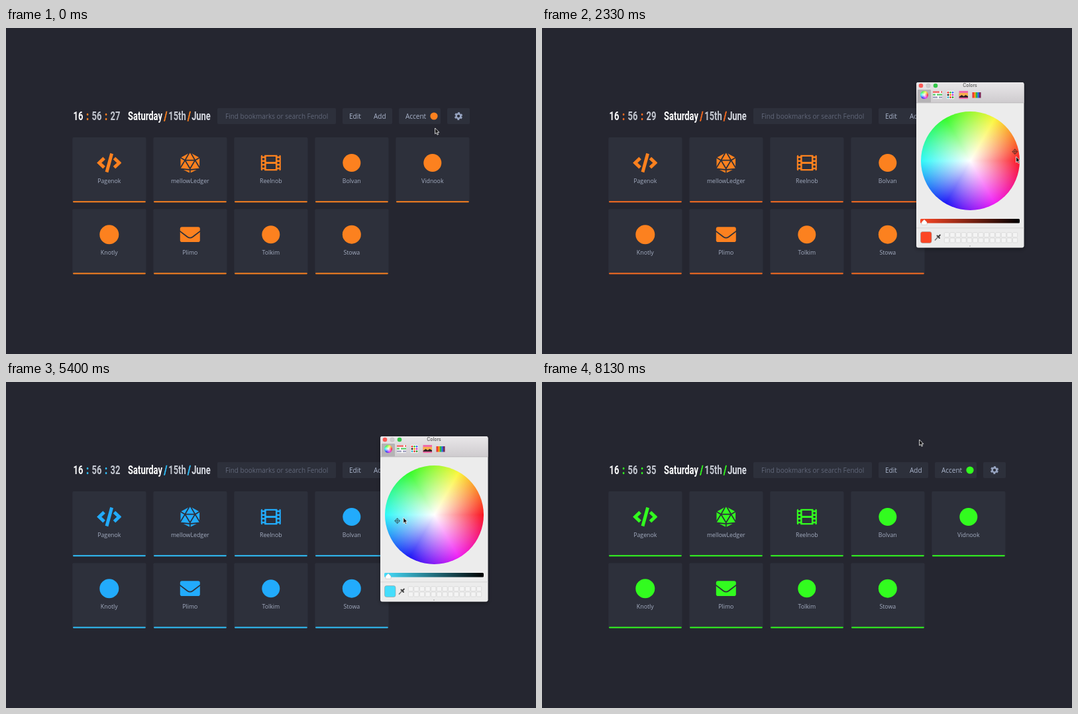
Animation of 800 by 492 pixels, one loop 8.19 s. Source, as an HTML page:

```html
<!DOCTYPE html>
<html lang="en">
<head>
<meta charset="utf-8">
<title>Start page accent colour</title>
<style>
html, body { margin: 0; width: 100%; height: 100%; overflow: hidden; background: #252630; }
svg { display: block; }
.panel { fill: #2d303b; }
.ui { font: 10px "Open Sans", sans-serif; fill: #a9b3ca; }
.label { font: 8.8px "Open Sans", sans-serif; fill: #a3acc0; text-anchor: middle; }
.clock { font: 700 18px Roboto, sans-serif; text-anchor: middle; }
.icon { fill: var(--icon); }
.line { fill: var(--line); }
.mark { fill: var(--line); stroke: var(--line); stroke-width: .7; }
.gap { fill: none; stroke: #2d303b; }
.wheel {
  width: 100%; height: 100%; border-radius: 50%;
  background: radial-gradient(closest-side, #fff, #fff0),
    conic-gradient(from 90deg, #fa1420, #f01ef4, #1c16f6, #2ef8f8, #33fb29, #fbf63a, #fa1420);
}
</style>
</head>
<body>
<svg id="stage" width="800" height="492" viewBox="0 0 800 492"></svg>
<script>
const LOOP = 8190, STEP = 66.6, WHEEL = { x: 646, y: 200.5, r: 74.5 };
const OPEN = 600, CLOSE = 7600, GRAB = 1950, DROP = 6450;

// Pointer path: time, x, y
const path = [
  [0, 647, 151], [300, 646, 134], [600, 646, 134], [1000, 644, 138], [1350, 660, 145],
  [1900, 710, 163], [2080, 710, 163], [2330, 715, 194], [2700, 712, 232], [3300, 690, 261],
  [3800, 664, 271], [4200, 659, 267], [4600, 610, 257], [5100, 579, 224], [5330, 590, 210],
  [5400, 600, 204], [5850, 616, 136], [6200, 617, 133], [6450, 618, 132], [6700, 618, 132],
  [7300, 569, 87], [LOOP, 569, 87]
];

const rect = (x, y, w, h, attrs = '') => `<rect x="${x}" y="${y}" width="${w}" height="${h}" ${attrs}/>`;
const circle = (x, y, r, attrs = '') => `<circle cx="${x}" cy="${y}" r="${r}" ${attrs}/>`;
const text = (x, y, s, attrs) => `<text x="${x}" y="${y}" ${attrs}>${s}</text>`;
const repeat = (n, f) => Array.from({ length: n }, (_, i) => f(i)).join('');
const wheel = (x, y, r) =>
  `<foreignObject x="${x - r}" y="${y - r}" width="${2 * r}" height="${2 * r}"><div class="wheel"></div></foreignObject>`;
const disc = r => circle(0, 0, r);

const chevron = '<path d="M-18.2 0L-9.4-8.4-6.4-5.2-12 0-6.4 5.2-9.4 8.4Z" stroke="var(--icon)" stroke-width=".9" stroke-linejoin="round"/>';
const icons = {
  code: chevron + `<g transform="scale(-1 1)">${chevron}</g>` +
    '<path d="M-3.8 14L3.8-14" stroke="var(--icon)" stroke-width="4.9"/>',
  die: '<path d="M0-15.5L14.3-7.7V8.2L0 15.5-14.3 8.2V-7.7Z"/>' +
    '<path class="gap" stroke-width="1.8" d="M0-17L-7.6-3.9H7.6L0-17M-15-8.2L-7.6-3.9L0 8.8L7.6-3.9L15-8.2M-15 8.2L-7.6-3.9M15 8.2L7.6-3.9M-15 9L0 10.5L15 9M0 8.8V16"/>',
  film: rect(-15, -11.7, 30, 23.4, 'rx="1.6"') +
    [-9.5, 1.5].map(y => rect(-7.2, y, 14.4, 8, 'class="panel" rx=".7"')).join('') +
    repeat(10, i => rect(i % 2 ? 9.6 : -13, (i >> 1) * 5.7 - 13, 3.4, 3.2, 'class="panel" rx=".6"')),
  mail: rect(-15, -11.4, 30, 22.8, 'rx="2.8"') +
    '<path class="gap" stroke-width="1.8" d="M-16-5.6L-4 3.5Q0 6.2 4 3.5L16-5.6"/>'
};

const cards = [
  ['Pagenok', icons.code], ['mellowLedger', icons.die], ['Reelnob', icons.film],
  ['Bolvan', disc(13.5)], ['Vidnook', disc(13.5)], ['Knotly', disc(14.5)],
  ['Plimo', icons.mail], ['Tolkim', disc(13.5)], ['Stowa', disc(14)]
];

const card = ([name, art], i) => `<g transform="translate(${100 + i % 5 * 122} ${165 + (i / 5 | 0) * 108.2})">
  ${rect(.3, 0, 111.2, 98, 'class="panel" rx="2"')}
  ${rect(1, 96.2, 109.8, 2, 'class="line" rx="1"')}
  <g class="icon" transform="translate(55.8 38.5)">${art}</g>
  ${text(55.8, 68.8, name, 'class="label"')}</g>`;

// One condensed face for the whole clock
const word = (x, s, fill, attrs = '') =>
  `<text class="clock" transform="translate(${x} 139) scale(.72 1)" ${fill} ${attrs}>${s}</text>`;
const mark = (x, s) => word(x, `<tspan class="mark">${s}</tspan>`, '');
const white = 'fill="#fff"', grey = 'fill="#c3c7d0"';

const header = word(109, '16', white) + mark(123, ':') + word(137, '56', grey) +
  mark(151, ':') + word(165, '27', grey, 'id="sec"') + word(210, 'Saturday', white) +
  mark(241, '/') + word(258.5, '15th', grey) + mark(276.5, '/') +
  word(294.5, 'June', 'fill="#d6d9e1"') +
  [[319, 179], [508, 75], [593, 63], [666, 34]].map(([x, w]) => rect(x, 121, w, 24, 'class="panel" rx="2"')).join('') +
  text(331, 136.6, 'Find bookmarks or search Fendol', 'class="ui" style="fill:#606678"') +
  text(518, 136.6, 'Edit', 'class="ui"') + text(555, 136.6, 'Add', 'class="ui"') +
  text(603, 136.6, 'Accent', 'class="ui"') +
  circle(646, 133, 5.6, 'class="line"') +
  '<g fill="none" stroke="#98a5c2">' + circle(683, 133, 3.4, 'stroke-width="2.5"') +
  circle(683, 133, 5.1, 'stroke-width="1.9" stroke-dasharray="2.8 2.54" stroke-dashoffset="-1.27"') + '</g>';

const hues = ['#f33', '#3c3', '#36f', '#222', '#f90', '#c3c', '#3bc', '#e33', '#393'];
const toolbar = rect(567, 93, 20, 19.5, 'fill="#b5b3b5" rx="1"') + wheel(577, 101, 6) +
  rect(590, 95, 14, 12, 'fill="#f7f7f7"') +
  repeat(3, i => rect(590, 95.5 + i * 4, 14, 2.2, `fill="${['#e55', '#5c6', '#99b'][i]}"`) +
    rect([600, 594, 597][i], 95 + i * 4, 2, 3.2, 'fill="#fff"')) +
  rect(611, 95, 11, 12, 'fill="#f7f7f7"') +
  repeat(9, i => circle(613 + i % 3 * 3.5, 97.3 + (i / 3 | 0) * 3.7, 1.4, `fill="${hues[i]}"`)) +
  rect(629.5, 95, 13.5, 12, 'fill="#f06aa8"') + rect(629.5, 98, 13.5, 5, 'fill="#f8b04c"') +
  '<path d="M629.5 104l4-3 3 2 3-2 3.5 2v2h-13.5z" fill="#332028"/>' +
  repeat(5, i => rect(649.5 + i * 2.6, 97, 2.6, 8.5, `fill="${['#e33', '#f80', '#2b4', '#26d', '#725'][i]}"`)) +
  rect(649.5, 95, 13, 2, 'fill="#ddd"');

const picker = rect(565, 82, 162.5, 249.5, 'rx="3" fill="#ececec" filter="url(#shadow)"') +
  '<path d="M565 113V85q0-3 3-3h156.5q3 0 3 3v28z" fill="url(#bar)"/>' +
  rect(565, 112.5, 162.5, .8, 'fill="#b5b3b5"') +
  circle(572, 87, 3.3, 'fill="#fc5b57"') + circle(583, 87, 3.3, 'fill="#cdcbcd" stroke="#bbb" stroke-width=".4"') +
  circle(594, 87, 3.3, 'fill="#34c84a"') +
  text(646, 89.4, 'Colors', 'text-anchor="middle" fill="#3c3c3c" style="font:7px Inter,sans-serif"') + toolbar +
  wheel(WHEEL.x, WHEEL.y, WHEEL.r) +
  `<g id="marker" fill="none" stroke="#222" stroke-opacity=".75" stroke-width=".8">${circle(0, 0, 3)}<path d="M-4.5 0h9M0-4.5v9"/></g>` +
  rect(571, 288, 150, 6.6, 'rx="1.5" fill="url(#shade)"') +
  '<path d="M577 289l4 4v4h-8v-4z" fill="#fff" stroke="#aaa" stroke-width=".4"/>' +
  rect(565, 301.5, 162.5, .8, 'fill="#cfcfcf"') +
  rect(571.5, 307.5, 16.5, 17, 'rx="3" style="fill:var(--pick)" stroke="#999" stroke-width=".6"') +
  '<path d="M593 320.5l5-5.5" stroke="#777" stroke-width="1.6"/><path d="M596.5 313.5l3.5 3.5M598.5 315l2.3-2.5" stroke="#444" stroke-width="2" stroke-linecap="round"/>' +
  repeat(26, i => rect(607.3 + i % 13 * 8.6, 308.7 + (i / 13 | 0) * 8.3, 7.2, 7, 'rx="1" fill="#f4f4f4" stroke="#d4d4d4" stroke-width=".7"')) +
  circle(646, 329, .8, 'fill="#999"');

const stage = document.getElementById('stage');
stage.innerHTML = `<defs>
  <linearGradient id="bar" x2="0" y2="1"><stop stop-color="#e9e7e9"/><stop offset="1" stop-color="#cecbce"/></linearGradient>
  <linearGradient id="shade"><stop style="stop-color:var(--pick)"/><stop offset="1"/></linearGradient>
  <filter id="shadow" x="-20%" y="-20%" width="140%" height="140%"><feDropShadow dx="0" dy="2" stdDeviation="3" flood-opacity=".4"/></filter>
  </defs>${header}${cards.map(card).join('')}<g id="picker">${picker}</g>
  <path id="pointer" d="M.6 0V8.8L2.6 7 4 10.2 5.5 9.5 4.2 6.4H6.8Z" fill="#111" stroke="#fff" stroke-width=".8"/>`;
const [sec, pickerBox, marker, pointer] = ['sec', 'picker', 'marker', 'pointer'].map(id => document.getElementById(id));

function mouse(t) {
  const i = Math.max(1, path.findIndex(p => p[0] >= t));
  const [t0, x0, y0] = path[i - 1], [t1, x1, y1] = path[i], k = (t - t0) / (t1 - t0);
  return [x0 + (x1 - x0) * k, y0 + (y1 - y0) * k];
}

// Picked point trails the pointer while dragging
function picked(t) {
  const [x, y] = mouse(Math.min(DROP, Math.max(GRAB, t - 60)));
  const dx = x - WHEEL.x, dy = y - WHEEL.y, k = Math.min(1, 73 / Math.hypot(dx, dy));
  return [dx * k, dy * k];
}

function colour(t) {
  const [dx, dy] = picked(t);
  const sat = Math.min(1, Math.hypot(dx, dy) / 73.5);
  const hue = (Math.atan2(-dy, dx) * 3 / Math.PI + 6) % 6;
  const channel = n => {
    const k = (n + hue) % 6;
    const v = 1 - sat * Math.max(0, Math.min(k, 4 - k, 1));
    return Math.round(30 + 222 * v ** 1.2);
  };
  return `rgb(${[5, 3, 1].map(channel)})`;
}

function draw(now) {
  const t = Math.floor((now % LOOP + 5) / STEP) * STEP % LOOP;
  const [px, py] = picked(t);
  stage.style.setProperty('--pick', colour(t));
  stage.style.setProperty('--line', colour(t - 130));
  stage.style.setProperty('--icon', colour(t - 240));
  sec.textContent = 27 + Math.floor((t + 300) / 1000);
  pickerBox.setAttribute('display', t >= OPEN && t < CLOSE ? 'inline' : 'none');
  marker.setAttribute('transform', `translate(${WHEEL.x + px} ${WHEEL.y + py})`);
  pointer.setAttribute('transform', `translate(${mouse(t)})`);
  requestAnimationFrame(() => draw(performance.now() - start));
}
const start = performance.now();
draw(0);
</script>
</body>
</html>
```
